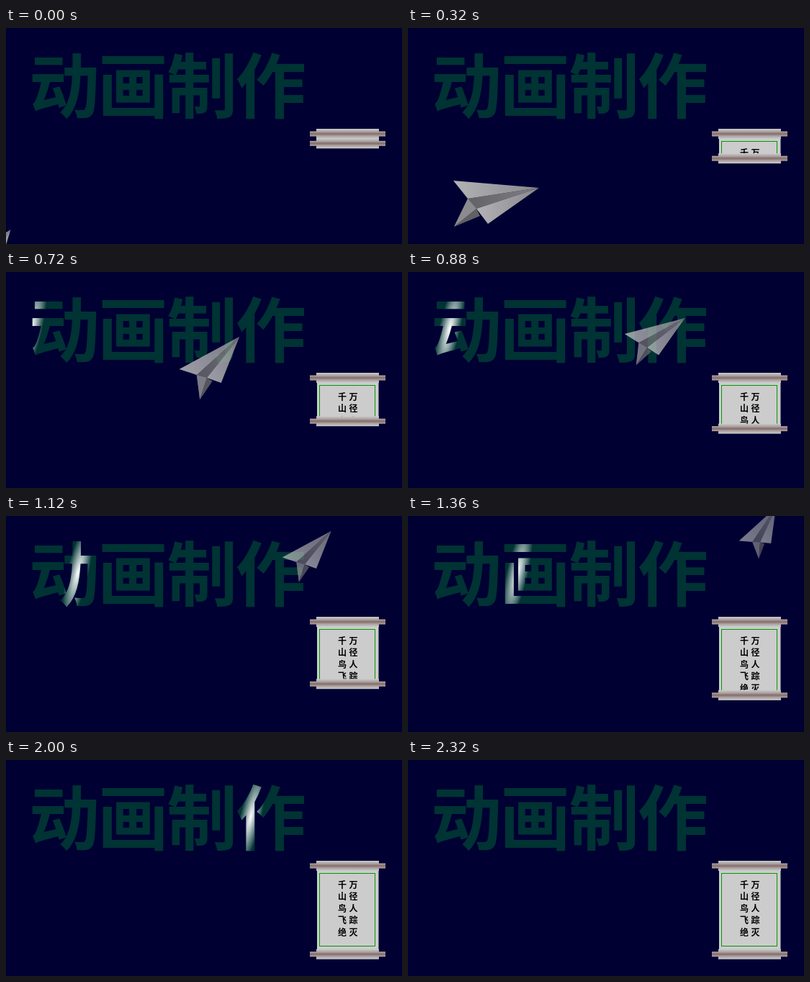
These frames come from a looping animation (550 px wide and 300 px high, 2400 ms). An HTML page:

```html
<!DOCTYPE html>
<html lang="zh">
<head>
<meta charset="utf-8">
<title>动画制作</title>
<style>
  html, body { margin: 0; width: 100%; height: 100%; overflow: hidden; background: #000033; }
  svg { display: block; width: 550px; height: 300px; }
  .title { font: 700 98px "Noto Sans CJK SC", "Noto Sans CJK", sans-serif; letter-spacing: -2.4px; }
  .poem { font: 700 12px "Noto Sans CJK SC", "Noto Sans CJK", sans-serif; text-anchor: middle; }
</style>
</head>
<body>
<svg viewBox="0 0 550 300">
  <defs>
    <radialGradient id="shine">
      <stop offset="0" stop-color="#fff"/>
      <stop offset="1" stop-color="#003333"/>
    </radialGradient>
    <linearGradient id="barrel" x2="0" y2="1">
      <stop offset="0" stop-color="#ccc"/>
      <stop offset=".5" stop-color="#858585"/>
      <stop offset="1" stop-color="#ccc"/>
    </linearGradient>
    <linearGradient id="rod" x2="0" y2="1">
      <stop offset="0" stop-color="#bda6a6"/>
      <stop offset=".5" stop-color="#7d6f6c"/>
      <stop offset="1" stop-color="#bda6a6"/>
    </linearGradient>
    <linearGradient id="wing">
      <stop offset="0" stop-color="#c4c4c4"/>
      <stop offset="1" stop-color="#959595"/>
    </linearGradient>
    <linearGradient id="fold">
      <stop offset="0" stop-color="#666"/>
      <stop offset="1" stop-color="#8c8c8c"/>
    </linearGradient>
    <clipPath id="letters"><text class="title" x="32" y="117">动画制作</text></clipPath>
    <clipPath id="open"><rect id="sheet" x="431" y="146" width="87" height="14"/></clipPath>
    <g id="roller">
      <rect x="431" y="-7" width="87" height="14" fill="url(#barrel)"/>
      <rect x="422" y="-3.5" width="105" height="7" fill="url(#rod)"/>
    </g>
  </defs>

  <rect width="550" height="300" fill="#000033"/>
  <text class="title" x="32" y="117" fill="#003333">动画制作</text>
  <g clip-path="url(#letters)">
    <ellipse id="beam" rx="15" ry="73" fill="url(#shine)"/>
  </g>

  <g clip-path="url(#open)">
    <rect x="432" y="146" width="85.5" height="130" fill="#ccc"/>
    <rect x="435.5" y="157.5" width="77" height="101" fill="none" stroke="#009900"/>
    <g id="poem" class="poem"></g>
  </g>
  <use href="#roller" y="147"/>
  <use id="lower" href="#roller"/>

  <g id="plane">
    <path d="M-22-6L-41 33L-10 8L77-21Z" fill="url(#fold)"/>
    <path d="M-22-6L-41 33L-10 8Z" fill="#999"/>
    <path d="M-10 8L-41 33L-5 18Z" fill="#6a6a6a"/>
    <path d="M77-21L-42-31L-22-6Z" fill="url(#wing)"/>
    <path d="M77-21L-10 8L6 29Z" fill="url(#wing)"/>
  </g>
</svg>
<script>
const LOOP = 2400, STEP = 80, UNROLLED = 21;
const el = id => document.getElementById(id);

// step, x, y, angle, scale
const flight = [
  [0, -48, 353, -38, 1.14],
  [4, 105, 243, 0, 1],
  [7, 221, 183, -47, .876],
  [11, 337, 97, -19.5, .727],
  [17, 489.5, 29, -47, .58],
  [21, 550, -9, -50, .5]
];

['千山鸟飞绝', '万径人踪灭'].forEach((line, col) => {
  [...line].forEach((ch, row) => {
    const t = document.createElementNS('http://www.w3.org/2000/svg', 'text');
    t.setAttribute('x', 467 + col * 15.5);
    t.setAttribute('y', 177.6 + row * 16.5);
    t.textContent = ch;
    el('poem').append(t);
  });
});

function slope(i, k) {
  const a = flight[Math.max(i - 1, 0)], b = flight[Math.min(i + 1, flight.length - 1)];
  return (b[k] - a[k]) / (b[0] - a[0]);
}

// cubic Hermite through the flight points; the angle eases to rest at each
function along(n, k) {
  let i = 0;
  while (i < flight.length - 2 && n >= flight[i + 1][0]) i++;
  const a = flight[i], b = flight[i + 1], d = b[0] - a[0], u = (n - a[0]) / d;
  const m0 = k === 3 ? 0 : slope(i, k) * d, m1 = k === 3 ? 0 : slope(i + 1, k) * d;
  const u2 = u * u, u3 = u2 * u;
  return (2 * u3 - 3 * u2 + 1) * a[k] + (u3 - 2 * u2 + u) * m0
       + (3 * u2 - 2 * u3) * b[k] + (u3 - u2) * m1;
}

function draw(n) {
  el('beam').setAttribute('transform', `translate(${-10 + .56 * n * n} 79) rotate(13)`);

  const y = 160.3 + 5.21 * Math.min(n, UNROLLED);
  el('lower').setAttribute('y', y);
  el('sheet').setAttribute('height', y - 146);

  const flying = n <= UNROLLED, plane = el('plane');
  plane.style.display = flying ? '' : 'none';
  if (flying) {
    const [x, py, r, s] = [1, 2, 3, 4].map(k => along(n, k));
    plane.setAttribute('transform', `translate(${x} ${py}) rotate(${r}) scale(${s})`);
    plane.setAttribute('opacity', 1 - .022 * n);
  }
}

function tick() {
  draw(Math.floor(performance.now() % LOOP / STEP));
  requestAnimationFrame(tick);
}
tick();
</script>
</body>
</html>
```
